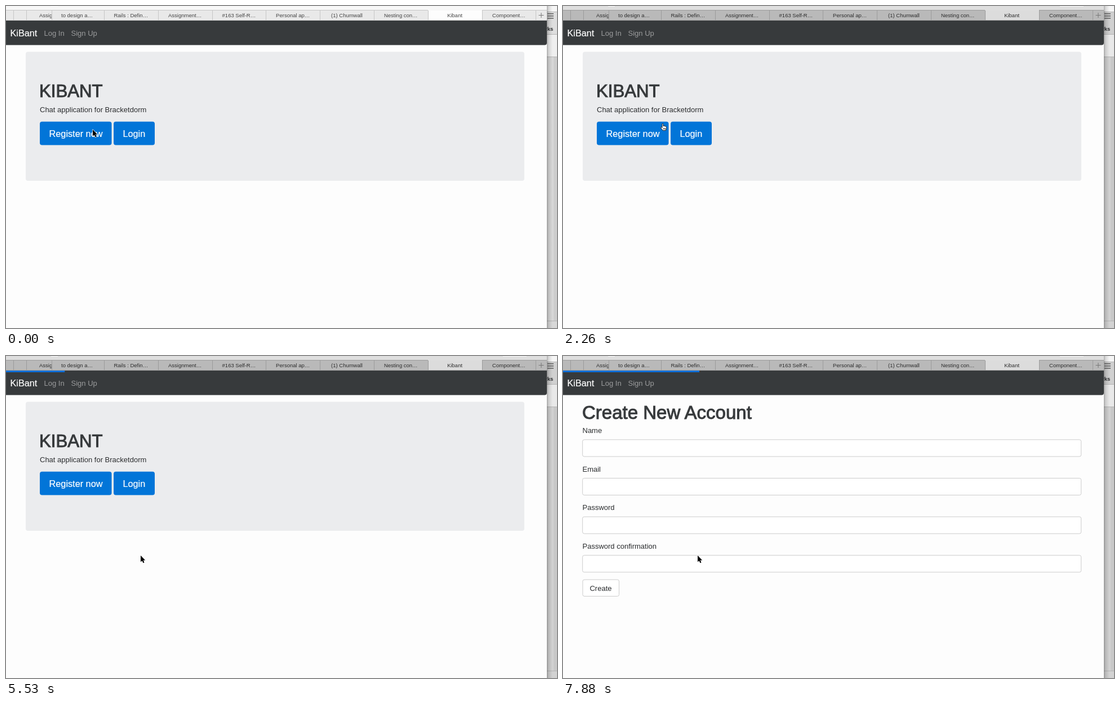
An HTML page that plays this animation: 978x573 px, repeating every 8 s.

```html
<!DOCTYPE html>
<html lang="en">
<head>
<meta charset="utf-8">
<title>KiBant</title>
<style>
  html, body { margin: 0; width: 100%; height: 100%; overflow: hidden; background: #fdfdfd; }
  svg { display: block; width: 978px; height: 573px; font: 13px "Liberation Sans", Arial, sans-serif; fill: #2b2d2f;
    --strip: #f7f7f7; --tab: #e9e9e9; --active: #fdfdfd; --edge: #c6c6c6; --label: #444;
    --back: #d8d8d8; --tool: #dedede; --field: #efefef; --top: #f5f5f5; }
  svg.focused { --strip: #dedede; --tab: #b9b9b9; --active: #dcdcdc; --edge: #9b9b9b; --label: #2c2c2c;
    --back: #d2d2d2; --tool: #d0d0d0; --field: #e9e9e9; }
  .tabs text { font-size: 9.5px; fill: var(--label); }
  .tabs path { stroke: var(--edge); fill: none; }
  .big { font-size: 16.25px; }
  .white { fill: #fff; stroke: #fff; stroke-width: .2px; }
  .link { fill: #9b9c9d; }
  .title { font-size: 33px; fill: #373a3c; stroke: #373a3c; stroke-width: 1px; }
  .box { fill: #fff; stroke: #ccc; }
  .mid { text-anchor: middle; }
</style>
</head>
<body>
<svg id="stage" viewBox="0 0 978 573">
  <defs>
    <linearGradient id="shade">
      <stop offset="0" stop-opacity=".3"/>
      <stop offset=".3" stop-opacity=".12"/>
      <stop offset="1" stop-opacity="0"/>
    </linearGradient>
    <clipPath id="cut"><rect width="81" height="26"/></clipPath>
  </defs>

  <!-- window behind -->
  <g>
    <rect x="960" width="18" height="573" fill="var(--back)"/>
    <rect x="960" width="18" height="10" fill="var(--top)"/>
    <rect x="960" y="10" width="18" height="41" fill="var(--tool)"/>
    <rect x="960" y="51" width="18" height="40" fill="var(--field)"/>
    <rect x="972" y="91" width="6" height="469" fill-opacity=".06"/>
    <path d="M960 10.5h18M960 50.5h18M960 90.5h18M960 560.5h18" stroke="#b4b4b4" fill="none"/>
    <path d="M961 13.8h11M961 17.8h11M961 21.8h11" stroke="#5a5a5a" stroke-width="1.6"/>
    <text x="957" y="43.5" font-size="9.5" font-weight="bold">rks</text>
    <rect x="960" width="10" height="573" fill="url(#shade)"/>
  </g>

  <rect width="960" height="573" fill="#fdfdfd"/>
  <g id="tabs" class="tabs">
    <rect width="960" height="8" fill="var(--strip)"/>
    <path d="M80 .3h12M882 .3h42" style="stroke:#fff"/>
    <rect y="8" width="960" height="18" fill="var(--tab)"/>
    <rect x="749" y="8" width="96" height="18" fill="var(--active)"/>
    <path d="M0 7.5H749M845 7.5H960M0 25.5H960M13.5 8v18M36.5 8v18M81.5 8v18"/>
    <text x="59" y="20" clip-path="url(#cut)">Assignment</text>
    <path d="M945.5 16.5h9M950 12v9" style="stroke:#777"/>
  </g>

  <path d="M0 26H960V65.6a4 4 0 0 1-4 4H0Z" fill="#373a3c"/>
  <text class="big white" x="7.5" y="53.5">KiBant</text>
  <text class="link" x="67.5" y="52.5">Log In</text>
  <text class="link" x="115.5" y="52.5">Sign Up</text>

  <g id="home">
    <rect x="35" y="81.5" width="885" height="229.5" rx="4" fill="#ebecee"/>
    <text class="title" x="59" y="162" style="font-size:31.2px">KIBANT</text>
    <text x="60" y="188.5">Chat application for Bracketdorm</text>
    <rect id="register" x="60" y="205.8" width="127.5" height="41.7" rx="4"/>
    <rect x="191" y="205.8" width="73" height="41.7" rx="4" fill="#0275d8"/>
    <text class="big white mid" x="124" y="232.5">Register now</text>
    <text class="big white mid" x="227.3" y="232.5">Login</text>
  </g>

  <g id="form">
    <text class="title" x="34" y="111.5">Create New Account</text>
    <rect class="box" x="35" y="398" width="64.5" height="29.5" rx="3"/>
    <text class="mid" x="67" y="417.5">Create</text>
  </g>

  <rect id="bar" y="26" height="2.9" fill="#0f70dc"/>
  <path id="arrow" d="M0 0V11.5L2.6 9.2 4.4 13.3 6.5 12.4 4.7 8.4H8.2Z"
        fill="#000" stroke="#fff" stroke-width="1.3" paint-order="stroke" stroke-linejoin="round"/>
  <path id="hand" d="M3 8V1.6C3-.1 5-.1 5 1.6V5C5.3 4 6.8 4.2 6.9 5.2 7.4 4.4 8.7 4.7 8.8 5.7 9.4 5.1 10.6 5.4 10.6 6.5V9L9.3 12.6H4.3L.6 8.2C-.1 7.1 1.3 6.2 2.1 7.1Z M5.4 8.4v2.4M7 8.4v2.4M8.6 8.4v2.4"
        fill="#fff" stroke="#111" stroke-width=".9" stroke-linejoin="round"/>
</svg>
<script>
const $ = id => document.getElementById(id);
const LOOP = 8000, STEP = 148, OFFSET = 180;

function add(parent, tag, attrs, text = '') {
  const node = document.createElementNS('http://www.w3.org/2000/svg', tag);
  for (const key in attrs) node.setAttribute(key, attrs[key]);
  node.textContent = text;
  parent.append(node);
}

['to design a…', 'Rails : Defin…', 'Assignment…', '#163 Self-R…', 'Personal ap…',
 '(1) Chumwall', 'Nesting con…', 'Kibant', 'Component…'].forEach((label, i) => {
  add($('tabs'), 'text', { x: 126 + i * 95.8, y: 20, class: 'mid' }, label);
  add($('tabs'), 'path', { d: `M${Math.round(174 + i * 95.8) + .5} 8v18` });
});

['Name', 'Email', 'Password', 'Password confirmation'].forEach((label, i) => {
  const y = i * 68.6;
  add($('form'), 'text', { x: 34.5, y: 137 + y }, label);
  add($('form'), 'rect', { class: 'box', x: 34.7, y: 148.9 + y, width: 885, height: 30, rx: 3 });
});

const span = (t, from, to) => Math.min(1, Math.max(0, (t - from) / (to - from)));
const smooth = p => p * p * (3 - 2 * p);
const within = (t, from, to) => t >= from && t < to;
const show = (id, visible) => $(id).style.display = visible ? '' : 'none';

const hold = t => Math.max(0, OFFSET + Math.floor((t - OFFSET) / STEP) * STEP);

// Settle on the button, swing up to its corner and back, then leave for the page.
function pointer(t) {
  const settle = smooth(span(t, 0, 620));
  const back = span(t, 1672, 2548);
  const swing = 23.6 * Math.sin(Math.PI * back) ** 4;
  const leave = smooth(span(t, 3900, 4760));
  return [
    154 + settle + 6.5 * back + swing + 77.5 * leave,
    220 + 10.5 * settle - 12 * back - swing + 136.5 * leave
  ];
}

// Quick start, slow trickle, then a leap once the page has arrived.
function loaded(t, created) {
  const start = 102 * (1 - Math.exp(-Math.max(0, t - 4028) / 230));
  return start + 23.5 * span(t, 5250, 7740) + (created ? 116.5 : 0);
}

function draw(t) {
  const held = hold(t);
  const [x, y] = pointer(held);
  const hand = within(t, 630, 4040);
  const pressed = within(t, 1220, 1820) || within(t, 3300, 3440);
  const created = t >= 7880;

  $('stage').classList.toggle('focused', t >= 1220);
  $('register').setAttribute('fill', pressed ? '#014682' : '#0275d8');
  $('bar').setAttribute('width', loaded(held, created));
  for (const id of ['arrow', 'hand']) $(id).setAttribute('transform', `translate(${x} ${y})`);
  show('hand', hand);
  show('arrow', !hand);
  show('home', !created);
  show('form', created);
}

const begin = performance.now();
function tick() {
  draw((performance.now() - begin) % LOOP);
  requestAnimationFrame(tick);
}
tick();
</script>
</body>
</html>
```
